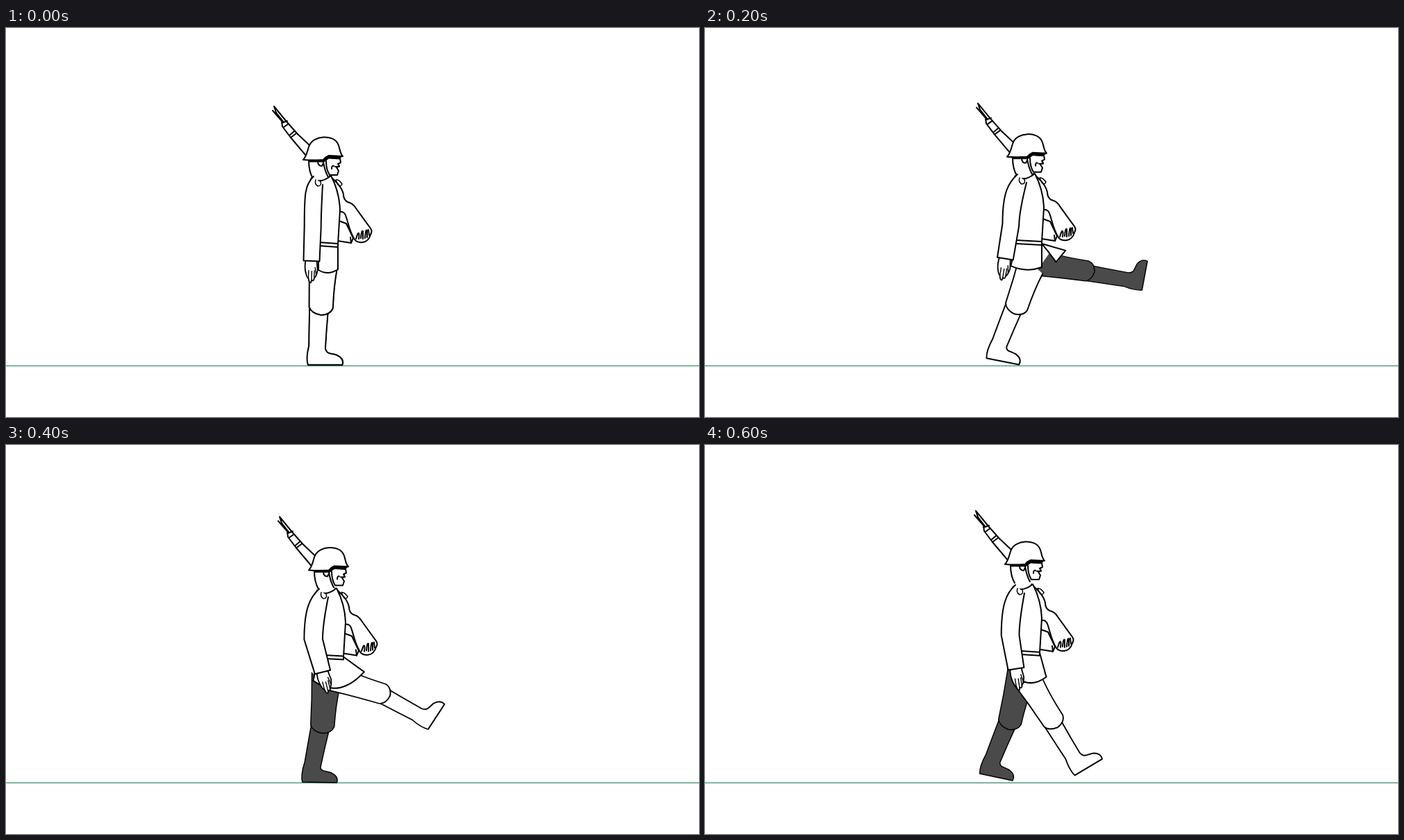
An HTML page for the animation above (0.7 s loop, 998 by 561 pixels).

```html
<!DOCTYPE html>
<html lang="en">
<head>
<meta charset="utf-8">
<title>Marching soldier</title>
<style>
  html, body { margin: 0; width: 100%; height: 100%; overflow: hidden; background: #fff; }
  svg { display: block; width: 100vw; height: 100vh; }
  #figure { fill: #fff; stroke: #000; stroke-width: 2; stroke-linecap: round; stroke-linejoin: round; }
  #far { fill: #4a4a4a; stroke-width: 1.5; }
  .line { fill: none; }
  .thin { fill: none; stroke-width: 1.5; }
  .ink { fill: #000; stroke-width: 1; }
</style>
</head>
<body>
<svg viewBox="0 0 998 561">
  <defs>
    <path id="thigh" d="M-21 -18Q-18 20 -17.5 57Q-14 66 0 68Q14 67 17 57Q17 25 21 0"/>
  </defs>
  <path d="M0 487.3H998" stroke="#55a07c" stroke-width="1.4"/>
  <g id="figure">
    <g id="far"><path class="boot"/><use href="#thigh"/></g>
    <g id="near"><path class="boot"/><use href="#thigh"/></g>
    <g id="head">
      <path stroke="none" d="M404 135L436 169L432 184L398 142Z"/>
      <path class="line" d="M386 113L404 135L420 153L437 169M384 119L397 134L398 142L410 158L432 184M386 113L389 122L400 136M397 137L405 134M400 143L407 138M408 155L415 149M410 158L418 152"/>
      <path stroke="none" d="M436 190L441 218L452 226L466 221L477 212L481 188Z"/>
      <path class="line" d="M436 191Q436 207 442 217M481 188L482 194L478 196L480 199L476 201L479 206L477 212L466 212M474 200H480M469 203Q469 198 472 199M457 193Q459 206 464 215M461 192Q461 204 466 212M449 192Q449 199 455 199L457 195"/>
      <path class="ink" d="M435 190H457L464 184L484 185L480 189L465 188L458 193H437Z"/>
      <path d="M428 190C434 184 434 175 437 169C443 155 471 153 478 167C481 172 480 180 485 185L465 184Q460 186 457 190Q441 191 428 190Z"/>
    </g>
    <g id="body">
      <path d="M479 278L490 282L500 303L497 310L478 307"/>
      <path d="M466 213C476 222 484 230 486 240Q486 248 492 251Q500 253 504 260Q514 274 525 289Q528 293 525 298Q522 308 514 309Q506 310 502 305C494 292 494 284 489 270Q487 265 482 265"/>
      <path class="line" d="M504 304Q507 294 508 296Q509 298 508 304M511 303Q512 291 514 293V304M517 303Q518 289 520 292V302M523 299L522 291M497 310L496 302"/>
      <path id="flap" d="M0 0L35 10L21 27L9 11Z"/>
      <path id="torso"/>
      <path id="belt" class="line"/>
      <g id="hand">
        <path d="M-9 -2C-11 8 -10 14 -8 20Q-6 27 -4 27Q-3 34 0 34Q1 33 1 30Q5 32 5 27Q9 23 10 14Q9 6 8 -2"/>
        <path class="thin" d="M-4 27V15M1 30V16M5 27V15M8 21L6 10"/>
      </g>
      <path id="sleeve"/>
      <path class="thin" d="M446 219Q444 225 449 228Q455 228 453 221M475 219Q479 218 484 225Q482 230 478 226Z"/>
    </g>
  </g>
</svg>
<script>
const LOOP = 700, STEP = 40, LAST = 15;

// body: drift, rise; cuff: x, y inside the body; legs: hip x, hip y, thigh and shin angle.
// Angles are degrees forward from straight down. Without a far leg both stand together.
const poses = [
  { at: 0,  body: [0, 0],     cuff: [440, 336], near: [456, 346, -2, -3] },
  { at: 3,  body: [5, -2],    cuff: [424, 335], near: [462, 348, -9, -16],  far: [489, 343, 86, 83] },
  { at: 6,  body: [8, -5.5],  cuff: [426, 336], near: [470, 348, -24, -26], far: [496, 341, 79, 78] },
  { at: 8,  body: [9, -5],    cuff: [440, 336], near: [462, 346, -1, -4] },
  { at: 10, body: [8, -9.5],  cuff: [448, 334], near: [488, 342, 73, 59],   far: [460, 348, -4, -12] },
  { at: 13, body: [4, -15.5], cuff: [507, 290], near: [488, 333, 96, 91],   far: [457, 346, -13, -19] },
  { at: 15, body: [4, -18],   cuff: [444, 335], near: [471, 350, 33, 31],   far: [452, 344, -13, -23] }
];

const $ = id => document.getElementById(id);
const rad = deg => deg * Math.PI / 180;
const swing = deg => Math.sin(rad(Math.max(0, deg)));
const mix = (a, b, k) => a.map((v, i) => v + (b[i] - v) * k);
const add = (p, dir, n) => [p[0] + dir[0] * n, p[1] + dir[1] * n];
const text = p => p.map(v => v.toFixed(1)).join(' ');
const setPath = (id, d) => $(id).setAttribute('d', d);
const move = (id, value) => $(id).setAttribute('transform', value);

function poseAt(step) {
  const next = Math.max(1, poses.findIndex(p => p.at >= step));
  const a = poses[next - 1], b = poses[next];
  const k = (step - a.at) / (b.at - a.at);
  const part = name => mix(a[name] || a.near, b[name] || b.near, k);
  return { body: part('body'), cuff: part('cuff'), near: part('near'), far: part('far') };
}

// Maps a point from a limb's own axes to its parent's, about a pivot.
const turned = (deg, [px, py]) => ([x, y]) => {
  const c = Math.cos(rad(deg)), s = Math.sin(rad(deg));
  return [px + x * c + y * s, py - x * s + y * c];
};

function drawLeg(id, [x, y, thigh, shin]) {
  const slim = 1 - .15 * Math.abs(Math.sin(rad(thigh)));
  move(id, `translate(${x} ${y}) rotate(${-thigh}) scale(${slim} 1)`);

  // The sole stays flat until the shin leans back, and follows a raised shin.
  const sole = shin > 0 ? shin : Math.min(0, shin + 11);
  const lower = turned(shin - thigh, [-3, 60]);
  const foot = turned(sole - thigh, lower([0, 62]));
  const L = (px, py) => text(lower([px, py]));
  const F = (px, py) => text(foot([px, py]));
  const d = `M${L(-14, -3)}Q${L(-13, 30)} ${L(-12, 53)}Q${F(-16, 8)} ${F(-13, 18)}`
    + `L${F(37, 18)}Q${F(40, 9)} ${F(29, 4)}C${F(20, 1)} ${F(14, 3)} ${L(12, 56)}Q${L(12, 30)} ${L(13, 2)}`;
  document.querySelector(`#${id} .boot`).setAttribute('d', d);
}

// The hem is pushed forward by the near thigh and back by either stride.
function drawCoat(near, far) {
  const stride = Math.max(swing(near), swing(far)) ** 2;
  const lift = (Math.max(0, near) / 96) ** 1.6;
  const front = add([478, 310], [swing(80 * lift), Math.cos(rad(80 * lift))], 38);
  const back = [450 - 17 * stride, 349 - 3 * stride];
  const sag = add(mix(front, back, .5), [0, 1], 9 + 38 * lift);
  const waist = 450 - 9 * stride;
  setPath('torso', `M440 216Q452 226 468 213Q480 236 481 262L478 312L${text(front)}`
    + `Q${text(sag)} ${text(back)}L${waist} 312Q441 270 437 225Z`);
  setPath('belt', `M${waist} 309L478 311V316L${waist} 314`);
  move('flap', `translate(478 314) scale(${swing(far) ** 2})`);
}

// Two-bone arm: the elbow follows from shoulder and cuff.
function drawArm(cuff) {
  const shoulder = [444, 222], upper = 65, fore = 49;
  const span = [cuff[0] - shoulder[0], cuff[1] - shoulder[1]];
  const reach = Math.hypot(...span);
  const along = span.map(v => v / reach), rear = [-along[1], along[0]];
  const a = (upper ** 2 - fore ** 2 + reach ** 2) / (2 * reach);
  const bend = Math.sqrt(Math.max(0, upper ** 2 - a ** 2));
  const elbow = add(add(shoulder, along, a), rear, bend);

  const angle = Math.atan2(cuff[0] - elbow[0], cuff[1] - elbow[1]);
  const side = [Math.cos(angle), -Math.sin(angle)];
  const outer = add(elbow, rear, 12 + bend / 4);
  const inner = add(elbow, rear, -12);
  setPath('sleeve', `M443 214C430 226 ${text(add(outer, [0, -1], 45))} ${text(outer)}`
    + `L${text(add(cuff, side, -11.5))}L${text(add(cuff, side, 11.5))}L${text(inner)}`
    + `Q${text(add(inner, [0, -1], 20))} 456 226`);
  move('hand', `translate(${cuff}) rotate(${-angle * 180 / Math.PI}) scale(.92)`);
}

function draw(step) {
  const { body: [drift, rise], cuff, near, far } = poseAt(step);
  move('head', `translate(${drift} ${rise})`);
  move('body', `translate(${drift} ${rise * .68})`);
  drawLeg('far', far);
  drawLeg('near', near);
  drawCoat(near[2], far[2]);
  drawArm(cuff);
}

let shown = -1;
function tick() {
  const step = Math.min(LAST, Math.floor(performance.now() % LOOP / STEP));
  if (step !== shown) draw(shown = step);
  requestAnimationFrame(tick);
}
tick();
</script>
</body>
</html>
```
